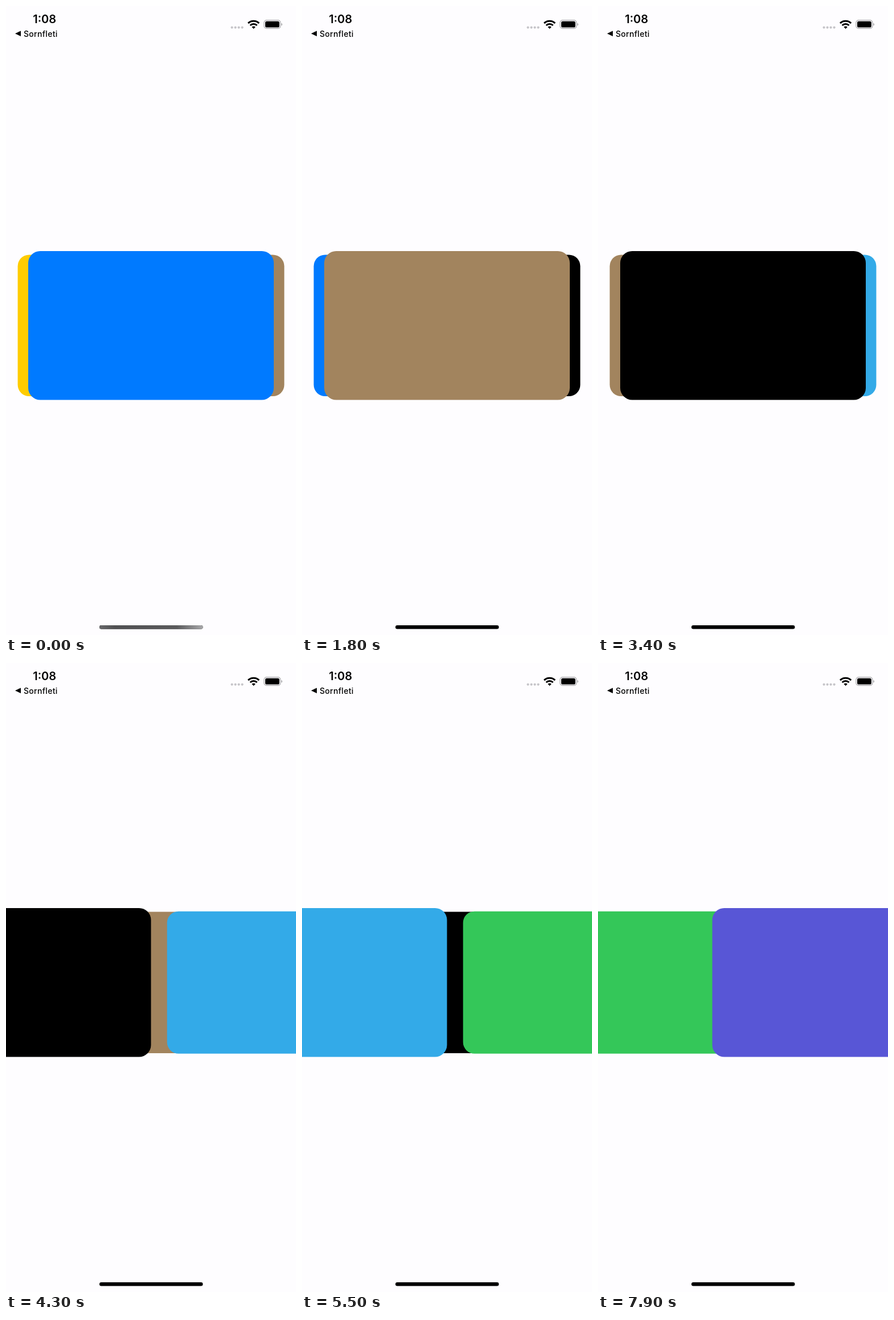
Recreate the animation shown at these times as an HTML page. Size 509 by 1101 pixels, loop 8 s.

```html
<!DOCTYPE html>
<html lang="en">
<head>
<meta charset="utf-8">
<title>Card stack</title>
<style>
  html, body { margin: 0; width: 100%; height: 100%; overflow: hidden; background: #fefdff; }
  svg { display: block; width: 100%; height: 100%; font-family: Inter, "Liberation Sans", sans-serif; }
</style>
</head>
<body>
<svg viewBox="0 0 509 1101">
  <defs>
    <linearGradient id="dim">
      <stop offset="0" stop-color="#68686a"/>
      <stop offset=".15" stop-color="#505052"/>
      <stop offset=".75" stop-color="#5a5a5c"/>
      <stop offset="1" stop-color="#a8a8aa"/>
    </linearGradient>
  </defs>

  <g id="cards"></g>

  <text x="67.7" y="30" font-size="20" font-weight="600" text-anchor="middle">1:08</text>
  <path d="M16 48.3 26 43.6V53z"/>
  <text x="31" y="53.6" font-size="14" font-weight="500" letter-spacing=".3">Sornfleti</text>

  <g fill="#c6c5c9">
    <circle cx="396.6" cy="37.6" r="2.1"/>
    <circle cx="402.6" cy="37.6" r="2.1"/>
    <circle cx="408.6" cy="37.6" r="2.1"/>
    <circle cx="414.6" cy="37.6" r="2.1"/>
  </g>

  <g fill="none" stroke="#000" stroke-width="3">
    <path d="M425 30.2a13.8 13.8 0 0 1 19.2 0"/>
    <path d="M428.6 34a8.6 8.6 0 0 1 12 0"/>
  </g>
  <path d="M434.6 40 431.4 36.7a4.6 4.6 0 0 1 6.4 0z"/>

  <rect x="453" y="24.8" width="28.8" height="14.6" rx="4.4" fill="none" stroke="#a3a2a6" stroke-width="1.2"/>
  <rect x="455" y="26.7" width="24.8" height="10.8" rx="2.6"/>
  <path d="M483.3 29.8a2.6 2.6 0 0 1 0 4.8z" fill="#a3a2a6"/>

  <rect x="164" y="1084" width="181.5" height="6.4" rx="3.2"/>
  <rect id="homeDim" x="164" y="1084" width="181.5" height="6.4" rx="3.2" fill="url(#dim)"/>
</svg>
<script>
  const LOOP = 8000, STEP = 100;
  const CX = 254.5, CY = 559.2, W = 431, H = 260.6, R = 21;
  const PEEK = 29.2, SIDE = 0.95, LIFTED = 0.956;
  const FRONT_OUT = 215.5, SIDE_OUT = 205;
  const COLORS = ['#ffcc00', '#007aff', '#a2845e', '#000', '#33aae8', '#34c759', '#5856d6', '#00c7be'];
  // [start time, direction]
  const SHUFFLES = [[1100, 1], [2700, 1], [4000, 1], [5200, 1], [6400, 1], [7800, -1]];

  const group = document.getElementById('cards');
  const homeDim = document.getElementById('homeDim');
  const rects = Array.from({ length: 3 }, () =>
    group.appendChild(document.createElementNS('http://www.w3.org/2000/svg', 'rect')));

  const clamp = v => Math.min(1, Math.max(0, v));
  const lerp = (a, b, k) => a + (b - a) * k;
  const ease = v => { const k = clamp(v); return k * k * (3 - 2 * k); };

  function place(rect, [color, dx, scale]) {
    const w = W * scale, h = H * scale;
    const box = { x: CX + dx - w / 2, y: CY - h / 2, width: w, height: h, rx: R * scale, fill: COLORS[color] };
    for (const key in box) rect.setAttribute(key, box[key]);
  }

  // Each layout lists [color, offset, scale] from back to front.
  const rest = i => [[i + 1, PEEK, SIDE], [i - 1, -PEEK, SIDE], [i, 0, 1]];

  const spread = (i, dir, k) => [
    [i - dir, -dir * PEEK, SIDE],
    [i + dir, dir * (PEEK + SIDE_OUT * k), lerp(SIDE, LIFTED, clamp(k * 1.4))],
    [i, -dir * FRONT_OUT * k, 1]
  ];

  const gather = (i, dir, k) => [
    [i + 2 * dir, dir * PEEK, SIDE],
    [i, -dir * lerp(FRONT_OUT, PEEK, k), lerp(1, SIDE, k)],
    [i + dir, dir * lerp(PEEK + SIDE_OUT, 0, k), lerp(LIFTED, 1, k)]
  ];

  function layout(t) {
    let i = 1;
    for (const [start, dir] of SHUFFLES) {
      const dt = t - start;
      if (dt < 0) break;
      if (dt <= 300) return spread(i, dir, ease((dt + 100) / 297));
      if (dt < 700) return gather(i, dir, ease((dt - 320) / 320));
      i += dir;
    }
    return rest(i);
  }

  function draw(now) {
    const t = Math.floor(now / STEP + 0.1) * STEP % LOOP;
    layout(t).forEach((card, n) => place(rects[n], card));
    homeDim.setAttribute('opacity', 1 - clamp((t - 1000) / 500));
    requestAnimationFrame(draw);
  }
  draw(0);
</script>
</body>
</html>
```
